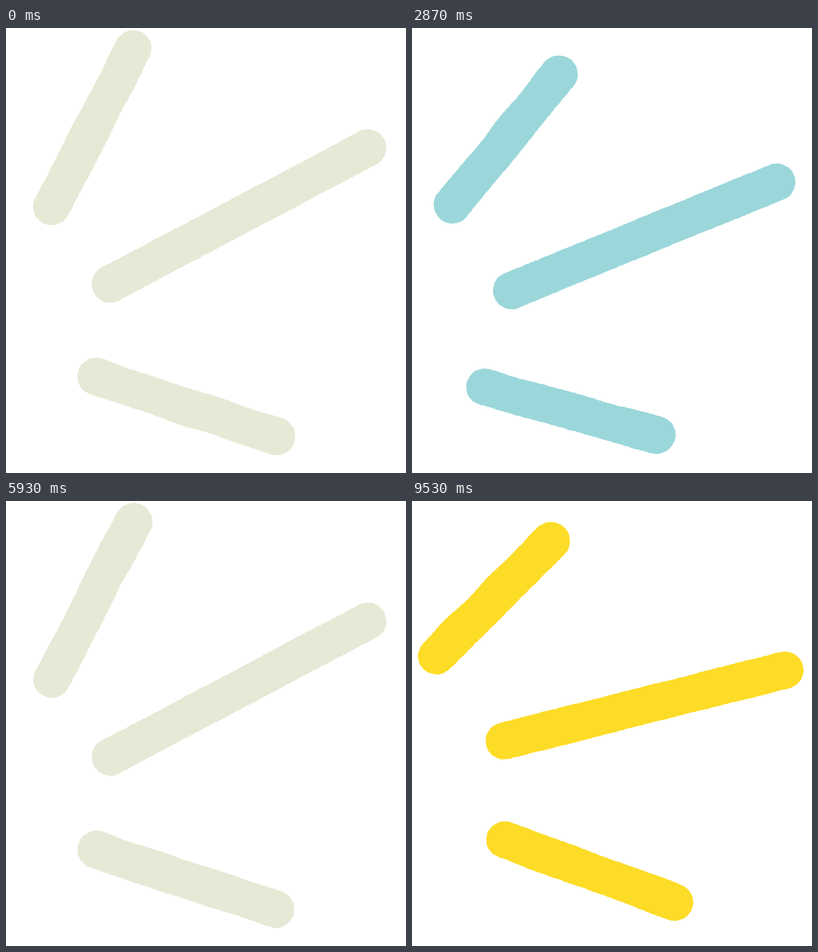
Recreate the animation shown at these times as an HTML page with a canvas. Size 691 by 768 pixels, loop 9.61 s.

```html
<!DOCTYPE html>
<html lang="en">
<head>
<meta charset="utf-8">
<title>Boiling strokes</title>
<style>
  html, body { margin: 0; width: 100%; height: 100%; overflow: hidden; background: #fff; }
  canvas { display: block; }
</style>
</head>
<body>
<canvas id="stage" width="691" height="768"></canvas>
<script>
const LOOP = 9610, SECOND_PASS = 4866, STEP = 74.9, TICK = 100 / 3;
const POSES = 64, PER_COLOR = 16, RADIUS = 32;

// Each line joins the centres of a bar's two round caps
const SCENES = [
  { color: '#e7e9d6', lines: 'M220 36L79 308 M625 207L180 442 M156 602L467 705' },
  { color: '#f46e60', lines: 'M272 105L72 274 M625 302L186 421 M144 591L405 731' },
  { color: '#9bd7da', lines: 'M255 79L70 306 M630 266L172 453 M125 620L423 703' },
  { color: '#fddc27', lines: 'M240 69L42 267 M644 292L159 414 M161 585L454 693' }
].map(({ color, lines }) => ({
  color,
  bars: lines.split(' M').map(line => line.match(/\d+/g).map(Number))
}));

const ctx = document.getElementById('stage').getContext('2d');

// Seeded random numbers in -1..1
function randomFrom(seed) {
  let state = seed * 7919;
  return () => {
    state = (state * 16807 + 11) % 2147483647;
    return state / 1073741823.5 - 1;
  };
}

// Smooth noise along a closed outline, u in 0..1
function closedNoise(count, rand) {
  const knots = Array.from({ length: count }, rand);
  return u => {
    const x = u * count, i = Math.floor(x);
    const k = (1 - Math.cos((x - i) * Math.PI)) / 2;
    return knots[i % count] * (1 - k) + knots[(i + 1) % count] * k;
  };
}

function drawBar([x1, y1, x2, y2], rand) {
  const length = Math.hypot(x2 - x1, y2 - y1);
  const half = length + Math.PI * RADIUS, total = 2 * half;
  const noise = closedNoise(Math.round(total / 55), rand);
  const wave = length > 400 ? 0.4 : 1.3; // the long bar stays straight

  ctx.save();
  ctx.translate((x1 + x2) / 2, (y1 + y2) / 2);
  ctx.rotate(Math.atan2(y2 - y1, x2 - x1));
  ctx.beginPath();
  for (let s = 0; s < total; s += 4) {
    const r = RADIUS + noise(s / total) * wave + rand() * 0.5;
    const side = s % half, flip = s < half ? 1 : -1;
    const turn = Math.max(0, side - length) / RADIUS;
    const along = Math.min(side, length) - length / 2 + r * Math.sin(turn);
    ctx.lineTo(flip * along, -flip * r * Math.cos(turn));
  }
  ctx.fill();
  ctx.restore();
}

function draw(pose) {
  const { color, bars } = SCENES[Math.floor(pose / PER_COLOR)];
  const rand = randomFrom(pose + 1);
  ctx.clearRect(0, 0, 691, 768);
  ctx.fillStyle = color;
  bars.forEach(bar => drawBar(bar, rand));
}

// The 64 poses run twice; the second pass ends one pose early
function poseAt(time) {
  const t = Math.floor((time + 4) / TICK) * TICK;
  const phase = t >= SECOND_PASS ? t - 4820 : t + 20;
  return Math.min(POSES - 1, Math.floor(phase / STEP));
}

let shown = -1;
function frame() {
  const pose = poseAt(performance.now() % LOOP);
  if (pose !== shown) draw(shown = pose);
  requestAnimationFrame(frame);
}
frame();
</script>
</body>
</html>
```
